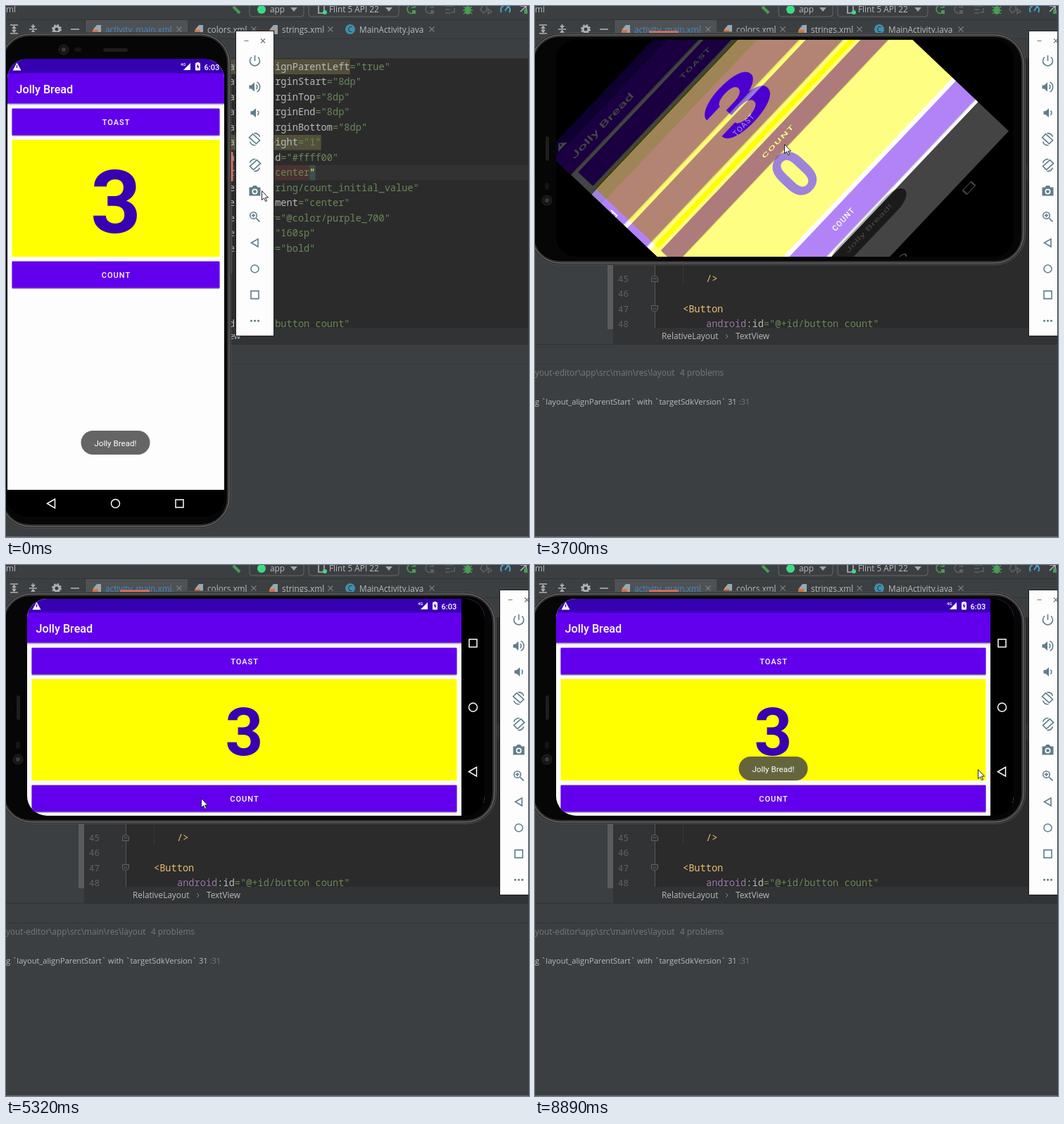
An HTML page that plays this animation: 743x754 px, repeating every 9.39 s.

```html
<!DOCTYPE html>
<html lang="en">
<head>
<meta charset="utf-8">
<title>Emulator rotation</title>
<style>
  html, body { margin: 0; width: 100%; height: 100%; overflow: hidden; background: #3c3f41; }
  svg { display: block; }
  text { white-space: pre; }
  .ui { font: 11.8px "Open Sans", "Noto Sans", sans-serif; fill: #bbb; }
  .code { font: 13.65px "Noto Sans Mono", "DejaVu Sans Mono", monospace; }
  .app { font-family: Roboto, Arial, sans-serif; font-weight: 500; fill: #fff; }
  .line { fill: none; stroke-width: 1.6; }
</style>
</head>
<body>
<svg id="stage" width="743" height="754" viewBox="0 0 743 754"></svg>
<script>
const LOOP = 9390;
const PORTRAIT_TO_LANDSCAPE = 'matrix(0 -1 1 0 -45 358)';
const LANDSCAPE_TO_PORTRAIT = 'matrix(0 1 -1 0 358 45)';

const rect = (x, y, w, h, fill, more = '') =>
  `<rect x="${x}" y="${y}" width="${w}" height="${h}" fill="${fill}" ${more}/>`;
const circle = (x, y, r, fill, more = '') =>
  `<circle cx="${x}" cy="${y}" r="${r}" fill="${fill}" ${more}/>`;
const text = (x, y, s, cls, more = '') => `<text x="${x}" y="${y}" class="${cls}" ${more}>${s}</text>`;
const line = (d, color, more = '') => `<path class="line" d="${d}" stroke="${color}" ${more}/>`;
const at = (x, y, body) => `<g transform="translate(${x} ${y})">${body}</g>`;

// ---------- IDE window ----------
const GREEN = '#499c54', GREY = '#5e6163', ICON = '#afb1b3';

function topBar() {
  const combo = (x, w) => rect(x, -9, w, 24, 'none', 'rx="4" stroke="#646769"');
  const arrow = x => `<path d="M${x - 5} 2h10l-5 6z" fill="#a0a3a5"/>`;
  const reload = (x, c) => line(`M${x + 4} 0a6 6 0 1 0 1 8M${x + 5}-3v5h-5`, c) + rect(x + 1, 6, 5, 5, c);
  return text(0, 9, 'ml', 'ui') +
    line('M320 -1l5 -3 M323 1l9 9', GREEN, 'style="stroke-width:4"') +
    combo(346, 77) + circle(363, 5, 6, '#3ddc84') + text(375, 9, 'app', 'ui') + arrow(409) +
    combo(430, 128) + line('M444 -3h8v13h-8z', ICON) + circle(453, 9, 3, '#3ddc84') +
    text(459, 9, 'Flint 5 API 22', 'ui') + arrow(544) +
    reload(576, GREEN) + reload(602, GREY) +
    line('M624 0h12M624 5h7M624 10h7M637 3v6h-5', GREY) +
    `<ellipse cx="656" cy="6" rx="4.5" ry="6" fill="${GREEN}"/>` + line('M650 1l12 10M662 1l-12 10M649 6h14', GREEN) +
    line('M678 -2l5 2v6l-5 4l-4 -5zM685 4l5 4l-5 3z', GREY) +
    line('M704 9a6.5 6.5 0 1 1 11 0M709 7l4 -6', '#4a9bc4', 'style="stroke-width:2.2"') +
    line('M731 0h8v8M731 8l8 -8', ICON) + rect(736, 5, 5, 6, GREEN);
}

function tabs() {
  const cross = x => line(`M${x - 3.5} 29.5l7 7m0 -7l-7 7`, '#7e8183', 'style="stroke-width:1.1"');
  const file = x => `<path d="M${x - 6} 33l5 -6h6v13h-11z" fill="#9aa7b0"/>` + rect(x - 7, 34, 8, 5, '#d9713c');
  return rect(0, 19, 743, 1, '#323232') + rect(0, 46, 743, 1, '#323232') +
    rect(112, 20, 1, 26, '#323232') + rect(113, 20, 145, 26, '#4e5254') +
    line('M6 27h11M6 39h11M11.5 29v8M9 32l2.5 -3l2.5 3M9 34l2.5 3l2.5 -3', ICON) +
    line('M33 33h11M38.5 26v5M38.5 40v-5M36 28l2.5 3l2.5 -3M36 38l2.5 -3l2.5 3', ICON) +
    circle(72, 33, 4, 'none', `stroke="${ICON}" stroke-width="3"`) +
    circle(72, 33, 6, 'none', `stroke="${ICON}" stroke-width="2" stroke-dasharray="2.5 2.21"`) +
    line('M92 33h12', ICON) +
    file(130) + text(141, 38, 'activity_main.xml', 'ui', 'style="fill:#4a88c7"') + cross(246) +
    file(275) + text(286, 38, 'colors.xml', 'ui') + cross(352) +
    file(381) + text(392, 38, 'strings.xml', 'ui') + cross(461) +
    circle(489, 33, 7, '#3f8fb0') +
    text(489, 37, 'C', 'ui', 'text-anchor="middle" style="fill:#2b2b2b;font-size:10px"') +
    text(502, 38, 'MainActivity.java', 'ui') + cross(605);
}

function editor() {
  const CHAR = 8.19, PITCH = 21.5, LEFT = 243;
  const rowY = n => 86 + (n - 31) * PITCH;
  const attr = (n, name, value) => text(LEFT, rowY(n) + 4.5,
    `<tspan fill="#9876aa">android</tspan><tspan fill="#bababa">:${name}</tspan><tspan fill="#6a8759">="${value}"</tspan>`, 'code');
  const mark = (n, col, len, color) => rect(LEFT + col * CHAR, rowY(n) - 10.5, len * CHAR, PITCH, color);
  const attrs = [
    ['layout_alignParentLeft', 'true'], ['layout_marginStart', '8dp'], ['layout_marginTop', '8dp'],
    ['layout_marginEnd', '8dp'], ['layout_marginBottom', '8dp'], ['layout_weight', '1'],
    ['background', '#ffff00'], ['gravity', 'center'], ['text', '@string/count_initial_value'],
    ['textAlignment', 'center'], ['textColor', '@color/purple_700'], ['textSize', '160sp'], ['textStyle', 'bold']];
  const numbers = [45, 46, 47, 48].map(n => text(118, rowY(n) + 4.5, n, 'code', 'fill="#606366" style="font-size:12.5px"'));
  const fold = (n, dir) => `<path transform="translate(170 ${rowY(n)}) scale(1 ${dir})"
    d="M-4.5 -4.5h9v6l-4.5 3l-4.5 -3zM-2.5 0h5" fill="#313335" stroke="#606366"/>`;
  return rect(111, 74, 632, 383, '#2b2b2b') + rect(111, 74, 59, 383, '#313335') + rect(320, 74, 423, 1, '#323232') +
    rect(103, 330, 8, 129, '#595b5d') + rect(170, 330, 1, 127, '#555759') + rect(210, 360, 1, 37, '#373737') +
    rect(170, rowY(38) - 10.5, 573, PITCH, '#323232') +
    mark(31, 0, 30, '#52503a') + mark(36, 0, 25, '#52503a') +
    mark(38, 17, 6, '#4b3230') + mark(38, 23, 1, '#3b514d') +
    attrs.map((a, i) => attr(31 + i, ...a)).join('') +
    text(LEFT + 23 * CHAR, rowY(38) + 4.5, '"', 'code', 'fill="#ffef28"') +
    numbers.join('') + fold(45, -1) + fold(47, 1) +
    text(LEFT, rowY(45) + 4.5, '/&gt;', 'code', 'fill="#e8bf6a"') +
    text(210, rowY(47) + 4.5, '&lt;Button', 'code', 'fill="#e8bf6a"') +
    attr(48, 'id', '@+id/button_count') +
    rect(111, 457, 632, 24, '#313335') +
    text(180, 473, 'RelativeLayout', 'ui') + line('M271 466l3 3l-3 3', '#888', 'style="stroke-width:1"') +
    text(285, 473, 'TextView', 'ui');
}

function problems() {
  return rect(0, 481, 743, 273, '#3c3f41') + rect(0, 480, 743, 1, '#323232') + rect(0, 508, 743, 1, '#323537') +
    text(0, 525, 'yout-editor\\app\\src\\main\\res\\layout', 'ui', 'style="fill:#787878"') +
    text(206, 525, '4 problems', 'ui', 'style="fill:#787878"') +
    text(0, 566, 'g `layout_alignParentStart` with `targetSdkVersion` 31 <tspan fill="#787878">:31</tspan>',
      'ui', 'style="font-size:11.1px"') +
    rect(0, 753, 743, 1, '#646667');
}

// ---------- phone ----------
function phoneBody() {
  return rect(319, 207, 3.5, 42, '#e2705c', 'rx="1"') + rect(319, 285, 2.5, 95, '#4a4a4a', 'rx="1"') +
    rect(-9.5, 37.5, 329, 704, '#303030', 'rx="43" stroke="#4c4c4c"') +
    rect(-7, 40, 324, 699, 'none', 'rx="41" stroke="#7a7a7a"') +
    rect(-4, 43, 318, 693, '#060606', 'rx="37"') +
    rect(138, 60, 35, 5, '#1d1d1d', 'rx="2.5"') +
    circle(82, 62, 7, '#151515', 'stroke="#262626"') + circle(82, 62, 3, '#3a3a3a') +
    rect(97, 59, 10, 6, '#151515', 'rx="3"');
}

const toastPill = (cx, y, more = '') => `<g ${more}>` +
  rect(cx - 49, y, 98, 34, '#494949', 'rx="17" fill-opacity=".843"') +
  text(cx, y + 21.5, 'Jolly Bread!', 'app', 'text-anchor="middle" style="font-size:11.6px;font-weight:400"') + '</g>';

function button(id, width, y, label) {
  return rect(6.5, y + 1.5, width - 13, 38, '#000', `id="${id}Shadow" opacity=".3" rx="1"`) +
    rect(6.5, y, width - 13, 38, '#6200ee', 'rx="1"') +
    rect(6.5, y, width - 13, 38, '#fff', `id="${id}Press" opacity="0"`) +
    text(width / 2 + .5, y + 23, label, 'app', 'text-anchor="middle" style="font-size:11px;letter-spacing:1px"');
}

function appScreen(id, width, height, viewHeight, digitSize, digitY) {
  const status = '<path d="M7.5 15.5h12l-6 -11z" fill="#fff"/>' + rect(12.9, 8, 1.3, 4, '#3700b3') +
    at(width, 0, text(-62, 9, '4G', 'app', 'style="font-size:6px"') +
      '<path d="M-58 15h10v-10z" fill="#fff"/>' +
      rect(-41, 5, 7, 10.5, '#fff', 'rx="1"') + rect(-39.5, 4, 4, 2, '#fff') +
      '<path d="M-37 6.5l-2.5 4h1.8v3l2.5 -4h-1.8z" fill="#3700b3"/>' +
      text(-28.5, 14.5, '6:03', 'app', 'style="font-size:11px"'));
  return rect(0, 0, width, height, '#fdfdfd') +
    rect(0, 62, width, 2, '#bbb') + rect(0, 64, width, 1.5, '#e6e6e6') +
    rect(0, -1, width, 21, '#3700b3') + rect(0, 19.5, width, 43, '#6200ee') + status +
    text(12.5, 47.5, 'Jolly Bread', 'app', 'style="font-size:16.2px"') +
    button(id + 'Toast', width, 69.5, 'TOAST') +
    rect(6.5, 114, width - 13, viewHeight, '#ff0') +
    text(width / 2, digitY, '3', 'app',
      `id="${id}Digit" text-anchor="middle" style="font-size:${digitSize}px;font-weight:700;fill:#3700b3"`) +
    button(id + 'Count', width, 120.5 + viewHeight, 'COUNT');
}

function navIcons(back, home, recent) {
  const stroke = 'fill="none" stroke="#fff" stroke-width="1.5"';
  return `<path transform="translate(${back})" d="M-6 0l11 -6.5v13z" ${stroke}/>` +
    `<circle transform="translate(${home})" r="6" ${stroke}/>` +
    `<path transform="translate(${recent})" d="M-5.5 -5.5h11v11h-11z" ${stroke}/>`;
}

const before = rect(2, 75, 308, 650, '#000') + at(2, 76, appScreen('old', 308, 611, 166, 125, 245.5)) +
  toastPill(155.5, 603) + navIcons('64.5 706.5', '155.5 706.5', '246.5 706.5');

const after = rect(30, 48, 650, 308, '#000') + at(30, 48, appScreen('new', 617, 308, 144, 94, 222)) +
  toastPill(338.5, 272, 'id="popup"') + navIcons('663.5 293.5', '663.5 202', '663.5 111');

// ---------- emulator side panel ----------
function sidePanel() {
  const C = '#5f7d8a', s = d => line(d, C), f = d => `<path d="${d}" fill="${C}"/>`;
  const speaker = f('M-6 -2.5h3l4.5 -4v13l-4.5 -4h-3z');
  const tilt = dir => `<g transform="scale(${dir} 1)">` +
    s('M-8 -2l5 -5l10 9l-5 5zM-1 -8a8 8 0 0 1 8 5M1 9a8 8 0 0 1 -8 -5') + '</g>';
  const icons = [
    s('M0 -8v8M-4.5 -5.5a7 7 0 1 0 9 0'),
    at(-2, 0, speaker + s('M4 -3a4 4 0 0 1 0 6M5 -7a8 8 0 0 1 0 14')),
    at(0, 0, speaker + s('M4 -3a4 4 0 0 1 0 6')),
    tilt(1), tilt(-1),
    f('M-8 -5h4l2 -2.5h4l2 2.5h4v12h-16z') + circle(0, 1, 3.2, C, 'stroke="#fff" stroke-width="1.7"'),
    circle(-2, -2, 4.7, 'none', `stroke="${C}" stroke-width="1.6"`) + s('M2 2l5 5M-4.5 -2h5M-2 -4.5v5'),
    s('M-5 0l9.5 -5.5v11z'),
    circle(0, 0, 5.5, 'none', `stroke="${C}" stroke-width="1.5"`),
    s('M-5.5 -5.5h11v11h-11z'),
    [-5, 0, 5].map(x => circle(x, 0, 1.6, C)).join('')];
  return rect(326.5, 35.5, 54, 433, '#fdfdfd', 'stroke="#222"') +
    line('M338.5 49.5h6M362 46.5l6 6m0 -6l-6 6', '#777', 'style="stroke-width:1.2"') +
    icons.map((icon, i) => at(353.5, 78 + i * 36.9, icon)).join('');
}

const stage = document.getElementById('stage');
stage.innerHTML = `
  <defs>
    <g id="before">${before}</g>
    <g id="after">${after}</g>
    <clipPath id="display">${rect(2, 75, 308, 650, '#000', 'rx="28"')}</clipPath>
    <clipPath id="oldArea">${rect(2, 75, 308, 650, '#000', 'id="oldFrame"')}</clipPath>
    <clipPath id="newArea">${rect(30, 48, 650, 308, '#000', 'id="newFrame"')}</clipPath>
  </defs>
  ${rect(0, 0, 743, 754, '#3c3f41')}${topBar()}${tabs()}${editor()}${problems()}
  <g id="phone">${phoneBody()}
    <g clip-path="url(#display)"><g transform="${LANDSCAPE_TO_PORTRAIT}">
      ${rect(30, 48, 650, 308, '#000')}
      <g clip-path="url(#oldArea)">
        <use id="oldFaded" href="#before"/>
        <g clip-path="url(#newArea)"><use id="oldSolid" href="#before"/><use id="newView" href="#after"/></g>
      </g>
    </g></g>
  </g>
  <g id="panel">${sidePanel()}</g>
  ${rect(742, 20, 1, 734, '#3c3f41')}
  <path id="cursor" d="M.5 .5v13l3 -2.8l2.2 4.8l2 -.9l-2.2 -4.6h4z" fill="#fff" stroke="#111" stroke-width=".9"/>`;

// ---------- timeline: each entry holds until the next ----------
const cursorSteps = [[0, 363, 262], [120, 378, 249], [290, 371, 235], [410, 362, 216], [540, 355, 201],
  [660, 353, 196], [3700, 354, 196], [3820, 358, 196], [4120, 285, 300], [4270, 282, 313], [4390, 279, 325],
  [4510, 277, 331], [5440, 335, 161], [5590, 347, 134], [5740, 351, 126], [6840, 520, 226], [6960, 629, 290]];
const turnSteps = [[0, 0], [3700, .483], [3820, .932], [3970, 1]];
const countSteps = [[0, 0], [4810, 1], [5050, 2], [5170, 3]];
const toastSteps = [[0, 0], [6140, .35], [6290, .75], [6410, .92], [6560, 1]];
const countPress = [[0, 0], [4660, .06], [4810, .1], [5320, 0]];
const toastPress = [[0, 0], [5990, .08], [6140, .12], [6290, .06], [6410, 0]];

const held = (steps, t) => steps.filter(s => s[0] <= t).pop().slice(1);
const part = id => document.getElementById(id);
const set = (id, name, value) => part(id).setAttribute(name, value);

function press(id, [amount]) {
  set(id + 'Press', 'opacity', amount);
  set(id + 'Shadow', 'transform', `translate(0 ${amount * 15})`);
}

function draw(t) {
  const [p] = held(turnSteps, t);
  const angle = -90 * (1 - p);
  const sx = 1 + p * (650 / 308 - 1), sy = 1 + p * (308 / 650 - 1);
  const oldPose = `translate(355 202) rotate(${angle}) scale(${sx} ${sy}) translate(-156 -400)`;
  const newPose = `rotate(${angle} 355 202)`;
  for (const id of ['oldFrame', 'oldFaded', 'oldSolid']) set(id, 'transform', oldPose);
  for (const id of ['newFrame', 'newView']) set(id, 'transform', newPose);
  set('oldFaded', 'opacity', (1 - p) ** 2);
  set('newView', 'opacity', p);

  set('phone', 'transform', t < 960 ? '' : PORTRAIT_TO_LANDSCAPE);
  set('panel', 'transform', t < 1080 ? '' : 'translate(375 0)');
  set('cursor', 'transform', `translate(${held(cursorSteps, t).join(' ')})`);

  part('newDigit').textContent = held(countSteps, t)[0];
  set('popup', 'opacity', held(toastSteps, t)[0]);
  press('newCount', held(countPress, t));
  press('newToast', held(toastPress, t));
}

const start = performance.now();
function tick() {
  draw((performance.now() - start) % LOOP);
  requestAnimationFrame(tick);
}
tick();
</script>
</body>
</html>
```
